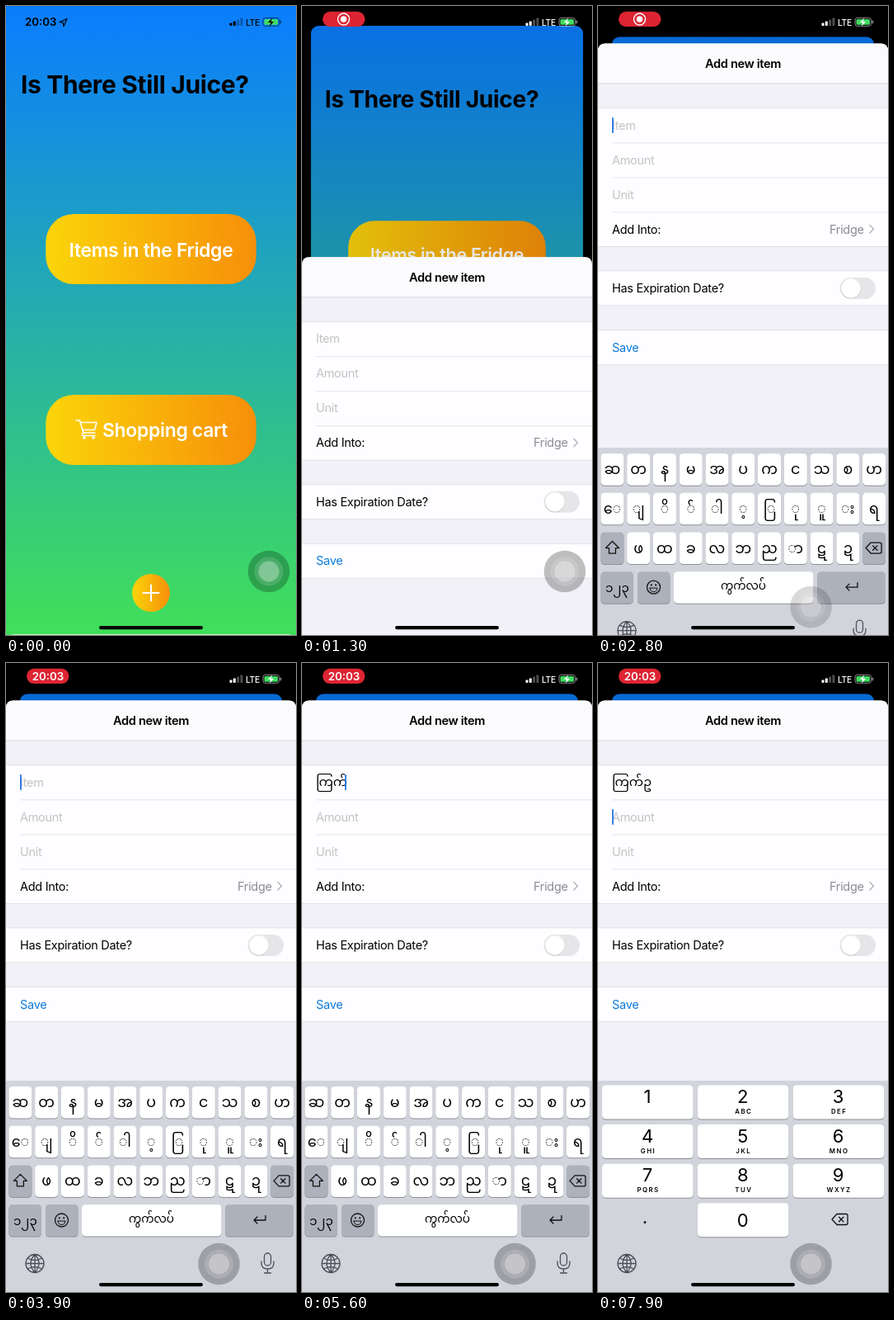
Animation of 352 by 762 pixels, one loop 8 s. Source, as an HTML page:

```html
<!DOCTYPE html>
<html lang="en">
<head>
<meta charset="utf-8">
<title>Kitchen list</title>
<style>
  html, body { margin: 0; width: 352px; height: 762px; overflow: hidden; background: #000; }
  svg { display: block; font-family: Inter, Roboto, "Liberation Sans", sans-serif; }
  .title { font-size: 30px; font-weight: 700; letter-spacing: -.35px; }
  .big { font-size: 23px; font-weight: 600; letter-spacing: -.35px; fill: #fff; }
  .nav { font-size: 14.6px; font-weight: 600; letter-spacing: -.35px; }
  .body { font-size: 14.5px; letter-spacing: -.3px; }
  .clock { font-size: 13.3px; font-weight: 600; }
  .lte { font-size: 10.2px; font-weight: 500; letter-spacing: -.2px; }
  .digit { font-size: 22px; }
  .abc { font-size: 7.8px; font-weight: 600; letter-spacing: 1.5px; }
  .mid { text-anchor: middle; }
  .burmese { font-family: "Noto Sans Myanmar", "Noto Sans", sans-serif; }
  .ink { fill: none; stroke: #000; stroke-width: 1.45; stroke-linecap: round; stroke-linejoin: round; }
  .dots { stroke: #777; stroke-width: 1; stroke-dasharray: .6 1.9; }
  .icon { fill: none; stroke: #4b4f57; stroke-width: 1.3; stroke-linecap: round; stroke-linejoin: round; }
</style>
</head>
<body>
<svg id="stage" width="352" height="762" viewBox="0 0 352 762"></svg>
<script>
const LOOP = 8000;

// ---- shape helpers ----
const rect = (x, y, w, h, r, fill, more = '') =>
  `<rect x="${x}" y="${y}" width="${w}" height="${h}" rx="${r}" fill="${fill}" ${more}/>`;
const disc = (x, y, r, fill, more = '') => `<circle cx="${x}" cy="${y}" r="${r}" fill="${fill}" ${more}/>`;
const text = (x, y, cls, str, fill = '#000', more = '') =>
  `<text x="${x}" y="${y}" class="${cls}" fill="${fill}" ${more}>${str}</text>`;
const line = (d, cls = 'icon', more = '') => `<path class="${cls}" d="${d}" ${more}/>`;
const group = (id, inner) => `<g id="${id}">${inner}</g>`;

// Clockwise arc between two angles in degrees, 0 = right
function arc(x, y, r, from, to) {
  const at = a => {
    const q = a * Math.PI / 180;
    return (x + r * Math.cos(q)).toFixed(2) + ' ' + (y + r * Math.sin(q)).toFixed(2);
  };
  return `M${at(from)}A${r} ${r} 0 ${to - from > 180 ? 1 : 0} 1 ${at(to)}`;
}
const ring = (x, y, r) => arc(x, y, r, 0, 180) + arc(x, y, r, 180, 360);
const R = 4.6;
const lobe = (side, from, to) => arc(side * R, 0, R, from, to);
const loop = side => ring(side * R, 0, R);

// ---- Burmese letters: [text, strokes used when no font has them, x of dotted base] ----
const KA = lobe(-1, 80, 360) + lobe(1, 180, 430);
const PA = arc(0, 0, 5, -50, 230);
const BRACKET = 'M9-5V-6.5Q9-8.5 7-8.5H-7Q-10-8.5-10-5.5V5.5Q-10 8.5-7 8.5H-2';
const glyphs = {
  hsa: ['ဆ', lobe(-1, 20, 340) + loop(1)],
  ta: ['တ', loop(-1) + lobe(1, 180, 430)],
  na: ['န', arc(0, -2, R, 100, 410) + 'M2.5 1.8q-6 2-2 4.500t2 3'],
  ma: ['မ', ring(0, 1, R) + 'M-4.500 1V-3.500q0-2.500 3-2'],
  a: ['အ', lobe(-1, 40, 320) + loop(1) + 'M0 0q0 6-5 6'],
  pa: ['ပ', PA],
  ka: ['က', KA],
  nga: ['င', arc(0, 0, 5, 50, 330)],
  tha: ['သ', lobe(-1, 0, 270) + lobe(1, 270, 540)],
  sa: ['စ', arc(0, 0, 5, 200, 510) + 'M-4.700-1.700L1 .5'],
  ha: ['ဟ', arc(-1.5, 0, 5, -50, 230) + 'M2-4q7-1 5 3t-4 6'],
  e: ['◌ေ', arc(-5, 0, 4, 50, 400), 5],
  ya: ['◌ျ', 'M-8 4q0 5 6 5h4q4 0 4-4V-2', -1],
  i: ['◌ိ', ring(0, -8, 2.2), 0],
  asat: ['◌်', arc(0, -8, 2.2, 50, 320), 0],
  aar: ['◌ါ', 'M2-5q4-5 5-1V6', -3],
  dot: ['◌့', ring(0, 8.5, .9), 0],
  yit: ['◌ြ', BRACKET, 0],
  u: ['◌ု', 'M2 6v5', -1],
  uu: ['◌ူ', 'M0 6v5M3 6v5', -1],
  vis: ['◌း', ring(6, -2.5, 1.2) + ring(6, 2.5, 1.2), -3],
  ra: ['ရ', arc(0, -1, R, 150, 360) + 'M4.500-1V6q0 2.500-2.500 2'],
  pha: ['ဖ', PA + 'M-3.200-3.800q3.200 5 6.400 0'],
  hta: ['ထ', loop(-1) + lobe(1, 200, 510)],
  kha: ['ခ', arc(0, 0, 5, 210, 510) + ring(-2.4, .6, 1.9)],
  la: ['လ', lobe(-1, 0, 250) + lobe(1, 180, 430)],
  bha: ['ဘ', lobe(-1, 0, 240) + loop(1)],
  nya: ['ည', lobe(-1, 80, 360) + loop(1) + 'M9 0V5q0 3-4 3H-3'],
  aa: ['◌ာ', arc(3.5, 0, 4.2, 210, 440), -5],
  tta: ['ဋ', arc(0, -2, 4, 120, 390) + 'M3.400 0q-7 3-2.500 5t2 4'],
  dda: ['ဍ', arc(0, -2, 4, 180, 450) + 'M0 2q-5 3 0 5.500t4.500-1'],
  ou: ['ဥ', arc(0, -1, 4.5, 170, 450) + 'M0 3.500q-4 1-1 3.500t5.500-.5'],
  kra: ['ကြ', KA + BRACKET],
  kasat: ['က်', KA + arc(2, -8, 2.2, 50, 320)],
  kwa: ['ကွ', KA + ring(0, 8, 2.5)],
  pasat: ['ပ်', PA + arc(0, -8.5, 2.2, 50, 320)],
  one: ['၁', arc(0, 0, 4.5, 180, 450)],
  two: ['၂', arc(0, -2, 4, 130, 380) + 'M3.700-1q-1 5-5 5.500t5 4'],
  three: ['၃', arc(0, -2, 4, 190, 450) + 'M0 2q4 .5 4 4t-5 3'],
};

// Missing letters all share one box width; real ones differ
const pen = document.createElement('canvas').getContext('2d');
pen.font = '40px "Noto Sans Myanmar", "Noto Sans", sans-serif';
const hasFont = pen.measureText('က').width !== pen.measureText('င').width;

const KEY_SIZE = 17.5;
const burmese = (x, y, str, size, cls = '') =>
  text(x, y, 'burmese ' + cls, str, '#000', `font-size="${size}"`);
function glyph(name, x, y, k = 1) {
  const [str, d, base] = glyphs[name];
  if (hasFont) return burmese(x, y + 5 * k, str, KEY_SIZE * k, 'mid');
  const dotted = base === undefined ? '' : line(ring(base, 0, 4.3), 'ink dots');
  return `<g transform="translate(${x} ${y}) scale(${k})">${dotted}${line(d, 'ink')}</g>`;
}
// A word from its syllables; slots are the syllable centres for the stroke form
function word(names, x, y, size, slots) {
  if (hasFont) return burmese(x, y, names.map(n => glyphs[n][0]).join(''), size);
  const k = size / 18;
  return names.map((n, i) => glyph(n, x + slots[i], y - 5 * k, k)).join('');
}

// ---- home screen ----
const card = y => rect(48.3, y, 255.4, 85, 34, 'url(#gold)');
const cart = 'M85 502h4.500l4.500 15h14M90 504.500h20l-2.500 9H93.500M94 517q-3 3.500 0 3.500h14';
const home = rect(0, 0, 352, 762, 0, 'url(#sky)', 'id="back"') +
  text(18, 106, 'title', 'Is There Still Juice?') +
  card(252) + text(176, 303.5, 'big mid', 'Items in the Fridge') +
  card(471) + text(117, 522, 'big', 'Shopping cart') +
  line(cart, 'icon', 'style="stroke:#fff;stroke-width:1.6"') +
  disc(95, 523, 1.8, '#fff') + disc(106, 523, 1.8, '#fff') +
  group('plus', disc(176, 711, 22.9, 'url(#gold)') +
    line('M166.500 711h19M176 701.500v19', 'icon', 'style="stroke:#fff;stroke-width:2"')) +
  rect(0, 0, 352, 762, 10, '#000', 'id="dim" opacity="0"');

// ---- form sheet ----
const cell = (y, h) => rect(0, y, 352, h, 0, '#fefdff') +
  rect(0, y - .5, 352, .8, 0, '#dddde1') + rect(0, y + h - .5, 352, .8, 0, '#dddde1');
const sheet =
  '<path fill="#f2f1f8" d="M0 54.500q0-9 9-9H343q9 0 9 9V724q0 38-38 38H38Q0 762 0 724z"/>' +
  '<path fill="#fbfafc" d="M0 54.500q0-9 9-9H343q9 0 9 9V94H0z"/>' + rect(0, 93.5, 352, .8, 0, '#d3d3d7') +
  text(176, 75, 'nav mid', 'Add new item') +
  cell(124, 167.5) + cell(321, 42) + cell(392.5, 42) +
  [165.5, 207.5, 249.5].map(y => rect(17, y, 335, .8, 0, '#dddde1')).join('') +
  group('hint', text(17, 149.5, 'body', 'Item', '#c3c3c6')) +
  text(17, 191.5, 'body', 'Amount', '#c3c3c6') + text(17, 233.5, 'body', 'Unit', '#c3c3c6') +
  text(17, 275.5, 'body', 'Add Into:') + text(281, 275.5, 'body', 'Fridge', '#8b8b90') +
  line('M330 265.500l4.500 4.700-4.500 4.700', 'icon', 'style="stroke:#b9b9be;stroke-width:1.6"') +
  text(17, 347, 'body', 'Has Expiration Date?') +
  rect(293.5, 329, 43.5, 26, 13, '#e6e6e9') + disc(307, 342.6, 12, '#0002') + disc(307, 342, 11.7, '#fff') +
  text(17, 418.5, 'body', 'Save', '#0a7bd8') +
  group('entry', '') + rect(0, 0, 1.8, 19, .8, '#2377e3', 'id="caret"');

// ---- keyboards ----
const rows = [
  'hsa ta na ma a pa ka nga tha sa ha',
  'e ya i asat aar dot yit u uu vis ra',
  'shift pha hta kha la bha nya aa tta dda del',
].map(r => r.split(' '));
const keyX = i => 17.4 + i * 31.77;
const keyY = j => 532 + j * 47.7;
const key = (x, y, w, fill = '#fff', h = 38.5) =>
  rect(x, y + 1, w, h, 4.5, '#8d9097') + rect(x, y, w, h, 4.5, fill);
const GREY = '#adb1bc';
const arrowUp = (x, y) => `M${x} ${y - 8}l8 8h-4v6.500h-8v-6.500h-4z`;
const erase = (x, y) => line(`M${x - 10} ${y}l6-6.500h11q2 0 2 2v9q0 2-2 2h-11z` +
  `M${x - 1.5} ${y - 2.7}l5.400 5.400m0-5.400l-5.400 5.400`, 'icon', 'style="stroke:#111"');

function letterKey(name, i, j, shifted) {
  const x = keyX(i), y = keyY(j);
  const special = name === 'shift' || name === 'del';
  const base = key(x - 14, y - 19, 28, special && !(shifted && name === 'shift') ? GREY : '#fff');
  if (name === 'del') return base + erase(x, y);
  if (name === 'shift') return base + line(arrowUp(x, y), 'icon', `style="stroke:#111;fill:${shifted ? '#111' : 'none'}"`);
  return base + glyph(name, x, y + 1);
}
const shiftRow = (row, j) => row.map((name, i) => {
  if (name === 'shift' || name === 'del') return name;
  if (j === 0 && i === 6) return 'ou';
  return j === 2 ? row[1 + (i + 3) % 9] : row[(i + 4) % 11];
});
const letters = shifted => rows.map((row, j) =>
  (shifted ? shiftRow(row, j) : row).map((name, i) => letterKey(name, i, j, shifted)).join('')).join('');

const bottomRow = key(3.4, 656, 39.5, GREY) + key(48, 656, 39.5, GREY) +
  key(92, 656, 169.5, '#fff') + key(266, 656, 83, GREY) +
  word(['one', 'two', 'three'], 9, 680.5, 15, [4, 13, 22]) +
  word(['kwa', 'kasat', 'la', 'pasat'], 149, 678, 13.6, [8, 22.5, 37, 50]) +
  disc(67.5, 675, 8, 'none', 'stroke="#111" stroke-width="1.3"') +
  disc(64.8, 672.3, 1.1, '#111') + disc(70.2, 672.3, 1.1, '#111') +
  line('M63 676h9q-.5 4.500-4.500 4.500t-4.500-4.500z', 'icon', 'style="stroke:#111;stroke-width:1"') +
  line('M315 669.500v5.500h-14m4-4l-4 4 4 4', 'icon', 'style="stroke:#111"');

const words = ['', 'ABC', 'DEF', 'GHI', 'JKL', 'MNO', 'PQRS', 'TUV', 'WXYZ'];
const pad = words.map((abc, n) => {
  const x = 5 + (n % 3) * 115.8, y = 511.5 + Math.floor(n / 3) * 47.6;
  return key(x, y, 110.5, '#fff', 41) + text(x + 55, y + 21.5, 'digit mid', n + 1) +
    text(x + 56, y + 34.5, 'abc mid', abc);
}).join('') + key(120.8, 654.3, 110.5, '#fff', 41) + text(175.8, 682.5, 'digit mid', '0') +
  text(57, 679, 'digit mid', '.') + erase(294, 674);

const globe = line(ring(35, 727.5, 11) + 'M24 727.500h22M35 716.500v22M26.500 721q8.500 5 17 0M26.500 734q8.500-5 17 0' +
  'M35 716.500q-10 11 0 22M35 716.500q10 11 0 22');
const mic = rect(313.5, 715, 8, 15, 4, 'none', 'stroke="#4b4f57" stroke-width="1.3"') +
  line('M310 725v2q0 7 7.500 7t7.500-7v-2M317.500 734v5M313.500 739h8');
const keyboard = rect(0, 506, 352, 262, 0, '#d2d4dc') +
  group('plain', letters(false)) + group('shifted', letters(true)) +
  group('space', bottomRow + mic) + group('pad', pad) + globe + group('pop', '');

// ---- status bar ----
const bars = [3.5, 5.5, 7.5, 9.5].map((h, i) =>
  rect(271.5 + i * 4.3, 24 - h, 3, h, .8, 'currentColor', `opacity="${i < 2 ? 1 : .3}"`)).join('');
const status = bars + text(291, 23.5, 'lte', 'LTE', 'currentColor') +
  rect(312, 14.5, 19.5, 9.8, 2.8, 'none', 'stroke="currentColor" stroke-opacity=".55"') +
  rect(313.5, 16, 16.5, 6.8, 1.6, '#3fdc62') + rect(332.6, 17.5, 1.5, 4, .7, 'currentColor', 'opacity=".6"') +
  '<path d="M323 14.500l-5 5.500h3.300l-1.300 4.500 5-5.500h-3.300z" fill="currentColor"/>' +
  group('clock', text(23, 24, 'clock', '20:03') +
    line('M65 19.500l9-4-4 9-.7-4.300z', 'icon', 'style="stroke:#000;stroke-width:1.2"')) +
  group('pill', rect(25, 6.8, 51.5, 18.3, 9.1, '#dd2433') +
    group('rec', disc(50.5, 16, 7, 'none', 'stroke="#fff" stroke-width="1.4"') + disc(50.5, 16, 3.8, '#fff')) +
    group('recTime', text(51, 21, 'clock mid', '20:03', '#fff')));

const touch = disc(0, 0, 25.3, '#000', 'opacity=".25"') + disc(0, 0, 17.5, '#fff', 'opacity=".14"') +
  disc(0, 0, 12.5, '#fff', 'opacity=".3"');

const fade = (id, from, to, dir) => `<linearGradient id="${id}" x1="0" y1="0" ${dir}>` +
  `<stop stop-color="${from}"/><stop offset="1" stop-color="${to}"/></linearGradient>`;
document.getElementById('stage').innerHTML =
  '<defs>' + fade('sky', '#0a7dfe', '#41df59', 'x2="0" y2="1"') + fade('gold', '#fbd50b', '#f78f09', 'x2="1" y2="0"') + '</defs>' +
  group('home', home) + group('sheet', sheet) + group('keyboard', keyboard) +
  group('status', status) + group('touch', touch) + rect(113, 751, 126, 4.2, 2.1, '#000');

// ---- motion ----
const $ = Object.fromEntries([...document.querySelectorAll('[id]')].map(n => [n.id, n]));
const ramp = (t, start, span) => Math.min(1, Math.max(0, (t - start) / span));
const easeOut = u => 1 - (1 - u) ** 3;
const show = (n, amount) => n.setAttribute('opacity', +amount);
const move = (n, v) => n.setAttribute('transform', v);
const mix = (a, b, p) => a + (b - a) * p;

// press time, key, column, row
const presses = [[4350, 'ka', 6, 0], [4700, 'yit', 6, 1], [5000, 'ka', 6, 0], [5300, 'asat', 3, 1], [6450, 'ou', 6, 0]];
const HOLD = 100;
// written syllables and caret x after each press
const entries = [['', 17], ['ka', 34], ['kra', 36.5], ['kra ka', 52], ['kra kasat', 52], ['kra kasat ou', 63]];
const written = entries.map(([names]) => names && word(names.split(' '), 17, 149, 15.3, [10, 27.5, 40.5]));
const balloons = presses.map(([, name, i, j]) => {
  const x = keyX(i), y = keyY(j);
  return `<path fill="#fff" stroke="#a9acb4" stroke-width=".6" d="M${x - 14} ${y + 15}v-32q0-6-5-10t-4-9v-20q0-8 8-8h30q8 0 8 8v20q0 5-4 9t-5 10v32q0 4-4 4h-20q-4 0-4-4z"/>` +
    glyph(name, x, y - 43, 1.6);
});
const last = {};
function fill(id, html) {
  if (last[id] !== html) $[id].innerHTML = last[id] = html;
}

const AMOUNT = 7400;
function frame(t) {
  // sheet rises while the home screen shrinks behind it
  const up = easeOut(ramp(t, 1150, 525));
  const k = mix(1, .9035, up);
  move($.home, `translate(${176 * (1 - k)} ${37.4 * up}) scale(${k})`);
  $.back.setAttribute('rx', 10 * Math.min(1, up * 3));
  show($.dim, .16 * up);
  show($.plus, t < 1000 ? 1 : .78);
  move($.sheet, `translate(0 ${716 * (1 - up)})`);

  const rec = ramp(t, 500, 200);
  $.status.setAttribute('color', up > .5 ? '#fff' : '#000');
  show($.clock, 1 - rec);
  show($.pill, rec);
  const timed = ramp(t, 3300, 200);
  show($.rec, 1 - timed);
  show($.recTime, timed);

  move($.keyboard, `translate(0 ${256 * (1 - easeOut(ramp(t, 2600, 390)))})`);
  const digits = t >= AMOUNT, shifted = t >= 5900 && t < 6600;
  show($.plain, !digits && !shifted);
  show($.shifted, !digits && shifted);
  show($.space, !digits);
  show($.pad, digits);

  const slide = easeOut(ramp(t, 2560, 220));
  move($.touch, `translate(${mix(319, 258.5, slide)} ${mix(685, 728, slide)})`);
  show($.touch, t < 2560 ? 1 : mix(.6, 1, ramp(t, 2850, 250)));

  const held = presses.findIndex(([at]) => t >= at && t < at + HOLD);
  fill('pop', held < 0 ? '' : balloons[held]);
  const typed = presses.filter(([at]) => t >= at + HOLD).length;
  fill('entry', written[typed]);
  show($.hint, !typed);

  // the blink restarts with every letter and on changing field
  const since = t - (digits ? AMOUNT : typed ? presses[typed - 1][0] : 2600);
  show($.caret, t >= 2600 && since % 1000 < 600);
  move($.caret, digits ? 'translate(17 177)' : `translate(${entries[typed][1]} 135)`);
}

const begin = performance.now();
function tick() {
  frame((performance.now() - begin) % LOOP);
  requestAnimationFrame(tick);
}
tick();
</script>
</body>
</html>
```
